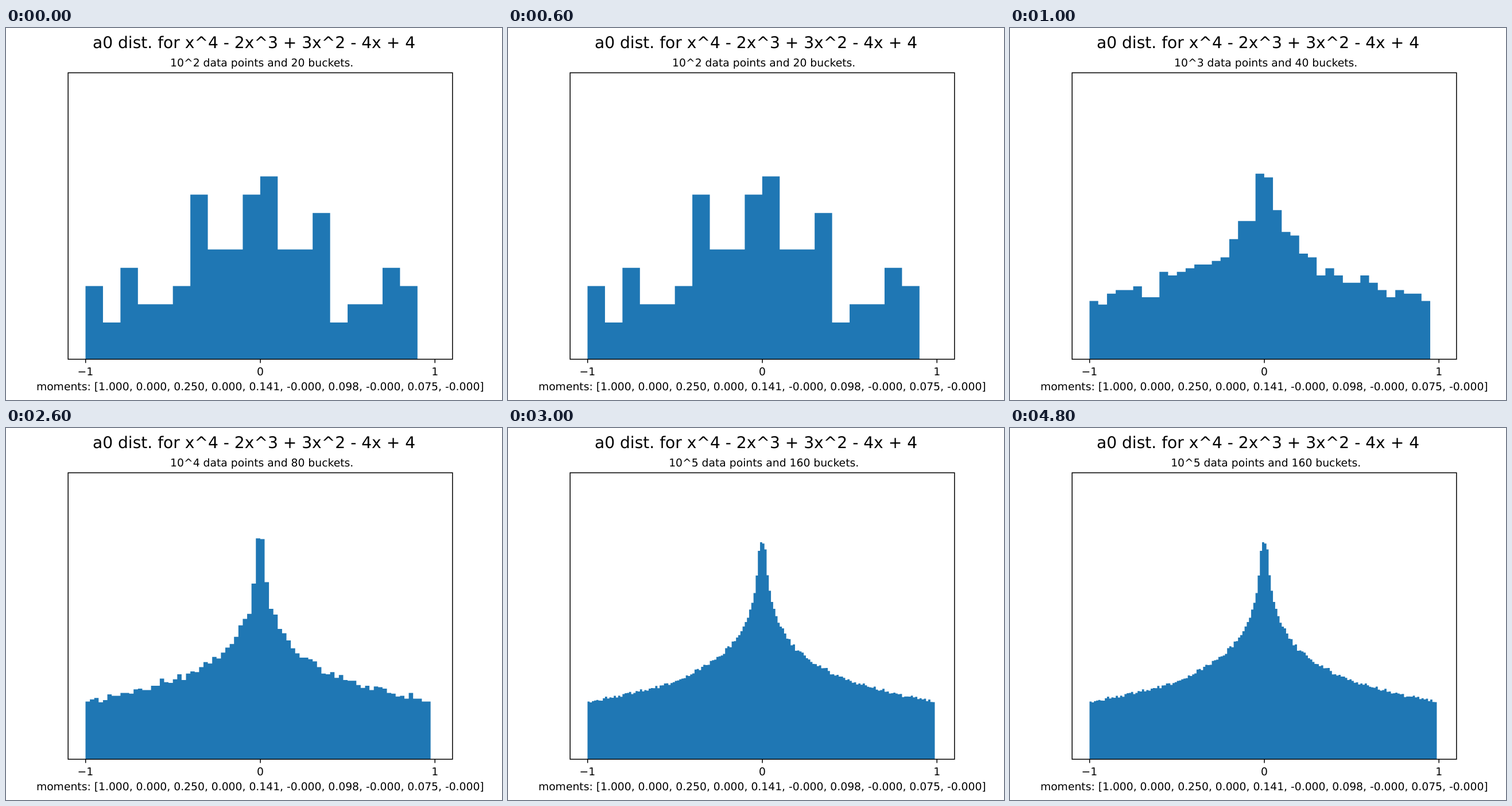
These frames come from a looping animation (864 px wide and 648 px high, 6000 ms). An HTML page:

```html
<!DOCTYPE html>
<html lang="en">
<head>
<meta charset="utf-8">
<title>Histogram refinement</title>
<style>
  html, body { margin: 0; width: 100%; height: 100%; overflow: hidden; background: #fff; }
  svg { display: block; width: 864px; height: 648px; }
  text {
    font: 18.75px "DejaVu Sans", sans-serif;
    text-anchor: middle;
    text-rendering: geometricPrecision;
    transform: rotate(0.001deg); /* keeps baselines off the pixel grid */
  }
  .title { font-size: 28.125px; }
  .bars { fill: #1f77b4; }
  .axes { fill: none; stroke: #000; stroke-width: 1.5; }
  .step { visibility: hidden; animation: 6s step-end infinite; }
  .step:nth-child(1) { animation-name: first; }
  .step:nth-child(2) { animation-name: second; }
  .step:nth-child(3) { animation-name: third; }
  .step:nth-child(4) { animation-name: last; }
  @keyframes first { 0% { visibility: visible } 16.6667%, 100% { visibility: hidden } }
  @keyframes second { 0% { visibility: hidden } 16.6667% { visibility: visible } 33.3333%, 100% { visibility: hidden } }
  @keyframes third { 0% { visibility: hidden } 33.3333% { visibility: visible } 50%, 100% { visibility: hidden } }
  @keyframes last { 0% { visibility: hidden } 50%, 100% { visibility: visible } }
</style>
</head>
<body>
<svg viewBox="0 0 864 648">
  <g id="steps"></g>
  <path class="axes" d="M108.2 78.1H777.8V577H108.2ZM138.7 577v6.6M443.1 577v6.6M747.2 577v6.6"/>
  <text class="title" x="432" y="34.6">a0 dist. for x^4 - 2x^3 + 3x^2 - 4x + 4</text>
  <text x="138.4" y="604.5">−1</text>
  <text x="443" y="604.5">0</text>
  <text x="747.2" y="604.5">1</text>
  <text x="442.8" y="630.6">moments: [1.000, 0.000, 0.250, 0.000, 0.141, -0.000, 0.098, -0.000, 0.075, -0.000]</text>
</svg>
<script>
const NS = 'http://www.w3.org/2000/svg';
const LEFT = 138.5, SPAN = 608.73, BASE = 576.75;
const DENSITY = 498.96 / 1.6; // pixels per unit of density

function agm(a, b) {
  for (let i = 0; i < 12; i++) [a, b] = [(a + b) / 2, Math.sqrt(a * b)];
  return a;
}

// Density of cos(s) * cos(t) for uniform s and t; its moments are those on the label
const density = x => 1 / (Math.PI * agm(1, Math.min(1, Math.abs(x))));

function meanDensity(x, half) {
  const n = 200;
  let sum = 0;
  for (let i = 0; i < n; i++) sum += density(x + half * ((2 * i + 1) / n - 1));
  return sum / n;
}

// Seeded noise with unit deviation
function makeNoise(seed) {
  const next = () => (seed = (seed * 1664525 + 1013904223) % 4294967296) / 4294967296;
  return () => 2 * (next() + next() + next() - 1.5);
}

// Expected counts with some scatter; the last bucket stays empty
function sample(total, buckets, half = 1 / buckets) {
  const noise = makeNoise(buckets);
  return Array.from({ length: buckets - 1 }, (_, i) => {
    const x = (2 * i + 1) / buckets - 1;
    const n = total * meanDensity(x, half) * 2 / buckets;
    return Math.round(n + 0.3 * Math.sqrt(n) * noise());
  });
}

function outline(counts, buckets) {
  const total = counts.reduce((a, b) => a + b);
  const scale = DENSITY * buckets / (2 * total);
  const edge = i => (LEFT + SPAN * i / buckets).toFixed(2);
  const bars = counts.map((n, i) => `V${(BASE - scale * n).toFixed(2)}H${edge(i + 1)}`);
  return `M${edge(0)} 577${bars.join('')}V577Z`;
}

function add(parent, tag, attrs, text = '') {
  const el = document.createElementNS(NS, tag);
  for (const key in attrs) el.setAttribute(key, attrs[key]);
  el.textContent = text;
  return parent.appendChild(el);
}

function addStep(power, buckets, counts) {
  const g = add(document.getElementById('steps'), 'g', { class: 'step' });
  add(g, 'path', { class: 'bars', d: outline(counts, buckets) });
  add(g, 'text', { x: 445.7, y: 66.6 }, `10^${power} data points and ${buckets} buckets.`);
}

addStep(2, 20, [4, 2, 5, 3, 3, 4, 9, 6, 6, 9, 10, 6, 6, 8, 2, 3, 3, 5, 4]);
addStep(3, 40, sample(1e3, 40));
addStep(4, 80, sample(1e4, 80));
addStep(5, 160, sample(1e5, 160, 0.029)); // the sharp peak is blurred here
</script>
</body>
</html>
```
